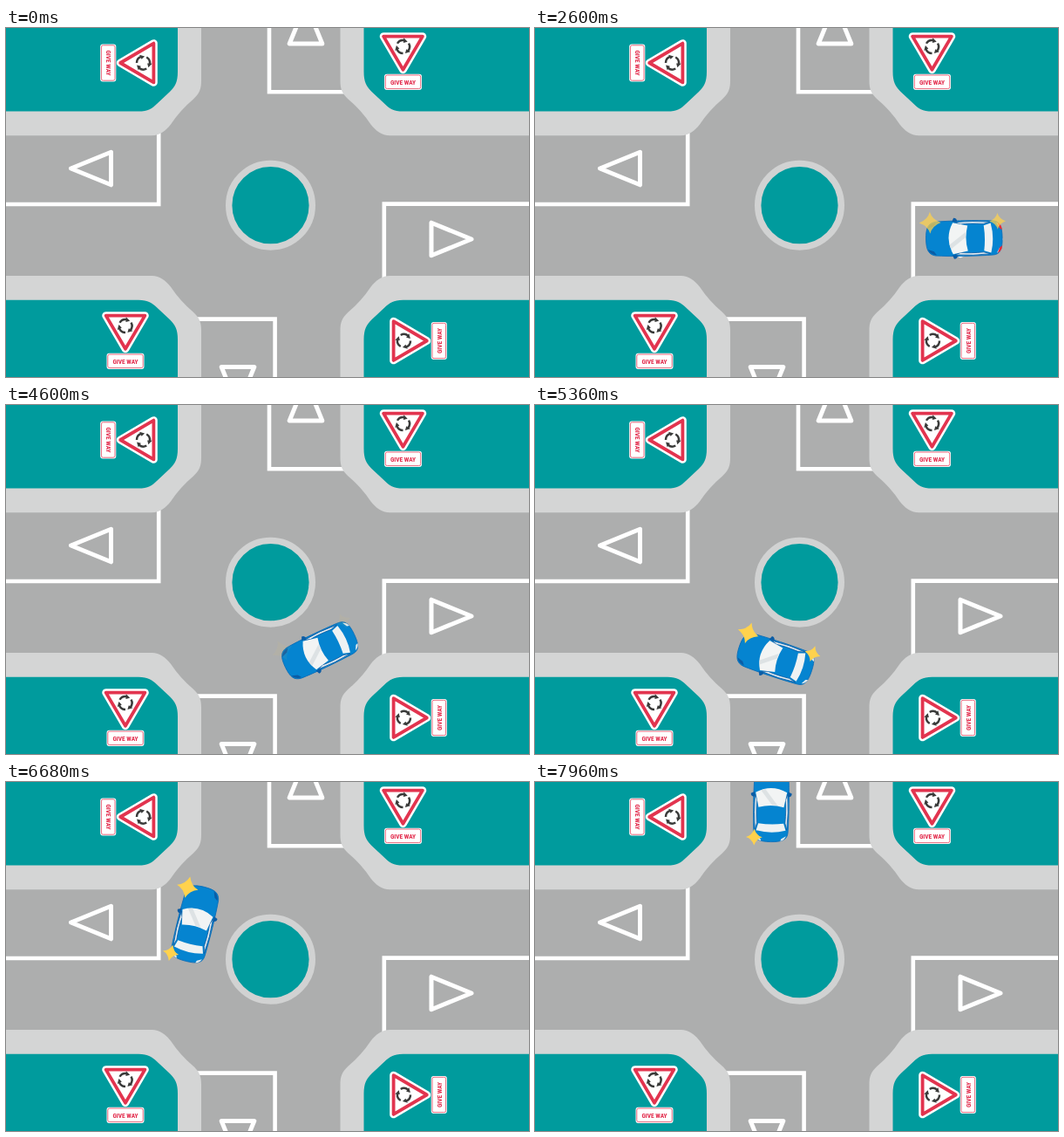
Recreate the animation shown at these times as an HTML page. Size 600 by 400 pixels, loop 8 s.

```html
<!DOCTYPE html>
<html lang="en">
<head>
<meta charset="utf-8">
<title>Turning right at a roundabout</title>
<style>
  html, body { margin: 0; width: 100%; height: 100%; overflow: hidden; background: #adaeae; }
  svg { display: block; width: 600px; height: 400px; }
  .marking { fill: none; stroke: #fff; stroke-width: 4.6; }
  .arrow { fill: none; stroke: #fff; stroke-width: 5; stroke-linejoin: round; }
  .plate-text {
    font: bold 7.4px "Roboto Condensed", Roboto, "Open Sans", sans-serif;
    font-stretch: 75%; fill: #e2294a; text-anchor: middle;
  }
</style>
</head>
<body>
<svg viewBox="0 0 600 400">
  <defs>
    <g id="corner">
      <path fill="#d4d5d5" d="M-9 123.3H167C177 123 183 118 189 110.5Q200 94 215 81.5C222 75 224 70 224 60V-9H-9Z"/>
      <path fill="#009b9d" d="M-9 95.6H152C163 95.6 168 92 173 87L188 73C194 67 197 62 197 50V-9H-9Z"/>
    </g>
    <path id="arrow" class="arrow" d="M0 -18.8V18.8L46 0Z"/>
    <g id="turn">
      <path d="M-6.5 -3.75A7.5 7.5 0 0 1 1.3 -7.4" fill="none" stroke="#3a3b3a" stroke-width="2.5"/>
      <path d="M.8 -10.2L5.2 -5.8L.4 -4.6Z" fill="#3a3b3a"/>
    </g>
    <g id="sign">
      <g stroke-linejoin="round">
        <path d="M-22.4 4.6H22.4L0 42.8Z" fill="#fff" stroke="#fff" stroke-width="8.8"/>
        <path d="M-22.4 4.6H22.4L0 42.8Z" fill="#fff" stroke="#e2344f" stroke-width="3.8"/>
      </g>
      <g transform="translate(0 16.5)">
        <use href="#turn"/>
        <use href="#turn" transform="rotate(120)"/>
        <use href="#turn" transform="rotate(240)"/>
      </g>
      <rect x="-21.5" y="47.7" width="43" height="18.2" rx="3" fill="#fff"/>
      <rect x="-20.2" y="49" width="40.4" height="15.6" rx="2" fill="none" stroke="#e2596f" stroke-width=".9"/>
      <text class="plate-text" x="0" y="59.5">GIVE WAY</text>
    </g>
    <path id="spark" fill="#ffd24d" d="M0 -12.5Q2.5 -3.5 12.5 0Q2.5 3.5 0 12.5Q-2.5 3.5 -12.5 0Q-2.5 -3.5 0 -12.5Z"/>
    <g id="side">
      <path fill="#0b5ca5" d="M-14 -19L-12 -23.5Q-8 -23.5 -8 -19Z"/>
      <path fill="#0b5ca5" d="M-42 -12Q-39 -18 -32 -18.5L-35 -14.5Z"/>
      <path fill="#e4ecf0" stroke="#0b5ca5" stroke-width=".8" d="M-11 -18.6Q10 -20.4 30 -18.2L22 -16.2Q6 -17.4 -4 -16.2Z"/>
      <path fill="#dfe8ec" d="M37 -17.5Q42 -15.5 42.7 -11L40 -12Z"/>
    </g>
    <path id="brake" fill="#ee2733" d="M38 -17.5Q43 -15.5 43.5 -9L40.5 -11Z"/>
  </defs>

  <rect width="600" height="400" fill="#adaeae"/>
  <g class="marking">
    <path d="M-5 202H175.2V115"/>
    <path d="M302 -5V73.2H392"/>
    <path d="M605 201.6H433.8V292"/>
    <path d="M215 333.6H308.6V405"/>
  </g>
  <use href="#arrow" transform="translate(488 242)"/>
  <use href="#arrow" transform="translate(120.5 161) rotate(180)"/>
  <use href="#arrow" transform="translate(344 18) rotate(-90)"/>
  <use href="#arrow" transform="translate(266 388.5) rotate(90)"/>

  <use href="#corner"/>
  <use href="#corner" transform="translate(607.5 0) scale(-1 1)"/>
  <use href="#corner" transform="translate(0 407.3) scale(1 -1)"/>
  <use href="#corner" transform="translate(607.5 407.3) scale(-1 -1)"/>
  <circle cx="303.5" cy="203.2" r="47.8" fill="#009b9d" stroke="#d1d2d2" stroke-width="7.4"/>

  <use href="#sign" transform="translate(455.5 5)"/>
  <use href="#sign" transform="translate(137 325)"/>
  <use href="#sign" transform="translate(174 40) rotate(90)"/>
  <use href="#sign" transform="translate(440 358.5) rotate(-90)"/>

  <path id="route" fill="none" d="M643 241H500Q468 241 435.3 246.4C395 253 360 295.5 304 295.5C250 295.5 213 250 213 195C213 120 271 95 271 25"/>

  <g id="car">
    <path fill="#0584d0" stroke="#0a6cb8" stroke-width=".8"
      d="M-44 0C-44 -13 -41 -18 -33 -19.4C-18 -20.6 15 -20.6 33 -19.6C41 -19 43.6 -13 43.6 0C43.6 13 41 19 33 19.6C15 20.6 -18 20.6 -33 19.4C-41 18 -44 13 -44 0Z"/>
    <use href="#side"/>
    <use href="#side" transform="scale(1 -1)"/>
    <path fill="#f2f4f4" d="M-13 -18Q-23 0 -13 18L4 14.5Q0 0 4 -14.5Z"/>
    <path fill="#dde2e4" d="M-17 7L1.5 -7L1.5 -1L-15.5 12Z"/>
    <path fill="#eef2f3" d="M22.5 -14.5L30.5 -17Q35 0 30.5 17L22.5 14.5Q24.5 0 22.5 -14.5Z"/>
    <g id="brakes">
      <use href="#brake"/>
      <use href="#brake" transform="scale(1 -1)"/>
    </g>
    <g id="blinker">
      <use href="#spark" x="-39" y="-18.5"/>
      <use href="#spark" transform="translate(38.5 -19) scale(.75)"/>
    </g>
  </g>
</svg>
<script>
const LOOP = 8000, STEP = 40, ENTER = 600, EXIT = 7960;
const BLINK = 1310, BRIGHTEST = 6670, SIDE_SWAP = BRIGHTEST - BLINK / 2;

const [route, car, blinker, brakes] =
  ["route", "car", "blinker", "brakes"].map(id => document.getElementById(id));
const show = (node, visible) => node.setAttribute("visibility", visible ? "inherit" : "hidden");

// Time and distance driven: approach, slow at the line, then cruise around
const pace = [
  [ENTER, 0], [2240, 134.5], [2600, 150.5], [3080, 162], [3840, 208],
  [EXIT, route.getTotalLength()]
];

// Cubic through the points, with slopes taken from the neighbours
function spline(points, t) {
  const last = points.length - 1;
  let i = 0;
  while (i < last - 1 && t >= points[i + 1][0]) i++;
  const slope = k => {
    const a = points[Math.max(k - 1, 0)], b = points[Math.min(k + 1, last)];
    return (b[1] - a[1]) / (b[0] - a[0]);
  };
  const [[t0, a], [t1, b]] = [points[i], points[i + 1]];
  const span = t1 - t0, u = (t - t0) / span, v = 1 - u;
  return v * v * (1 + 2 * u) * a + u * u * (3 - 2 * u) * b
    + span * u * v * (v * slope(i) - u * slope(i + 1));
}

function brightness(t) {
  const wave = (1 + Math.cos(2 * Math.PI * (t - BRIGHTEST) / BLINK)) / 2;
  return wave * Math.min(1, .3 + t / 5000);
}

function draw(time) {
  const t = Math.floor(time % LOOP / STEP) * STEP;
  show(car, t >= ENTER);
  show(brakes, t > 1600 && t < 3100);

  const distance = spline(pace, Math.max(t, ENTER));
  const [front, centre, back] = [4, 0, -4].map(d => route.getPointAtLength(distance + d));
  const heading = Math.atan2(back.y - front.y, back.x - front.x) * 180 / Math.PI;
  car.setAttribute("transform", `translate(${centre.x} ${centre.y}) rotate(${heading})`);
  blinker.setAttribute("transform", `scale(1 ${t < SIDE_SWAP ? 1 : -1})`);
  blinker.setAttribute("opacity", brightness(t));
}

const start = performance.now();
function tick() {
  draw(performance.now() - start);
  requestAnimationFrame(tick);
}
tick();
</script>
</body>
</html>
```
